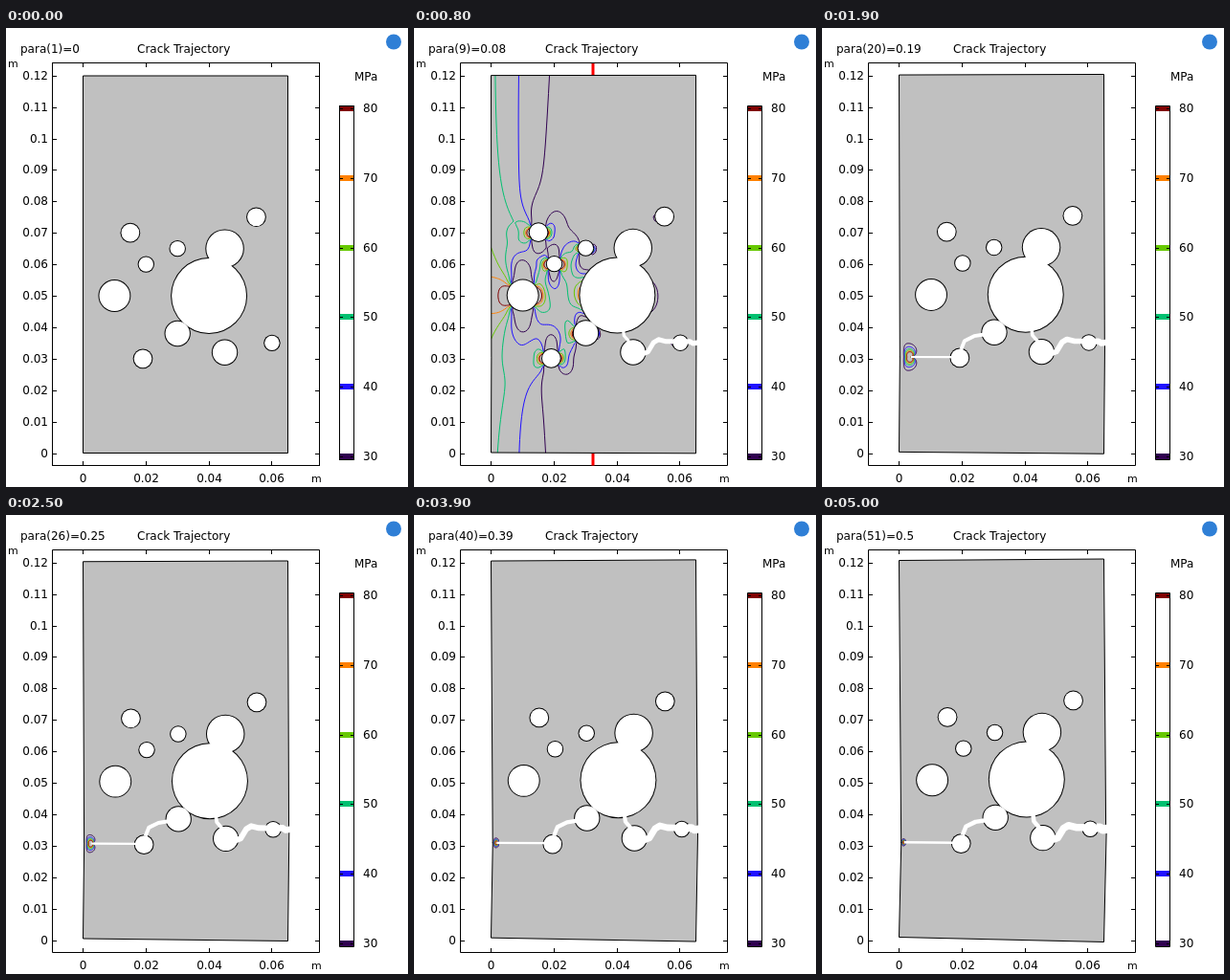
Write an HTML page with a canvas that moves like this. It is 420x480 px and loops after 5.1 s.

```html
<!DOCTYPE html>
<html lang="en">
<head>
<meta charset="utf-8">
<title>Crack Trajectory</title>
<style>
html, body { margin: 0; width: 100%; height: 100%; overflow: hidden; background: #fff; }
canvas { display: block; }
</style>
</head>
<body>
<canvas id="stage" width="420" height="480"></canvas>
<script>
const ctx = document.getElementById('stage').getContext('2d');
const STEPS = 51, STEP_MS = 100, SCALE = 3290, CELL = 2;
const LEFT = 80.5, RIGHT = 294.5, TOP = 50, BOTTOM = 444.5;
const LEVELS = [[30, '#300050'], [40, '#2010ff'], [50, '#00c070'], [60, '#66c800'], [70, '#ff8000'], [80, '#800000']];
const toX = x => LEFT + x * SCALE, toY = y => BOTTOM - y * SCALE;

// x, y, radius in mm; the last value marks holes that the crack cuts in two
const holes = [
  [40, 50, 12], [45, 65, 6], [10, 50, 5], [30, 38, 4], [45, 32, 4, 1], [55, 75, 3],
  [15, 70, 3], [19, 30, 3, 1], [30, 65, 2.5], [20, 60, 2.5], [60, 35, 2.5, 1]
].map(([x, y, r, split]) => ({ x: toX(x / 1000), y: toY(y / 1000), r: r * SCALE / 1000, part: split ? 0.5 : 0 }));

// first step, width, widening, points
const cracks = [
  [7, 4.5, 4.5, [[284, 328], [288, 328], [291, 330], [297, 329]]],
  [7, 4.5, 3, [[239, 341], [244, 339], [250, 329], [255, 326], [263, 328], [272, 328]]],
  [7, 3, 1.5, [[218, 315], [219, 322], [225, 329]]],
  [9, 3.5, 1, [[170, 321], [158, 323], [148, 328], [144.5, 337]]]
];

const loads = [0, .2, .4, .6, .8, 1, 1.2, .8, .5, .35, .24, .18];
const loadAt = k => loads[k] ?? .18 * (11 / k) ** 3;
const side = x => (x - 187) / 107;

// Largest principal stress for vertical tension, summing the Kirsch solution of each hole
function stress(x, y, list) {
  let yy = .93 + .26 * side(x) ** 2, xx = 0, xy = 0;
  for (const h of list) {
    const dx = x - h.x, dy = y - h.y, r = Math.hypot(dx, dy) || 1;
    const q = Math.min(1, (h.r / r) ** 2), c = dy / r, s = dx / r;
    const cos2 = c * c - s * s, sin2 = 2 * s * c, half = h.weight / 2;
    const rr = half * (-q + (3 * q * q - 4 * q) * cos2);
    const tt = half * (q - 3 * q * q * cos2);
    const rt = -half * (2 * q - 3 * q * q) * sin2;
    yy += rr * c * c + tt * s * s - rt * sin2;
    xx += rr * s * s + tt * c * c + rt * sin2;
    xy += (rr - tt) * sin2 / 2 + rt * cos2;
  }
  return { yy, main: (yy + xx) / 2 + Math.hypot((yy - xx) / 2, xy) };
}
holes.forEach((h, i) => { h.weight = Math.max(.25, stress(h.x, h.y, holes.slice(0, i)).yy); });

const cols = 109, rows = 199;
const field = Float32Array.from({ length: cols * rows }, (_, i) =>
  stress(LEFT + i % cols * CELL, TOP + Math.floor(i / cols) * CELL, holes).main);

function drawField(k) {
  const load = 50 * loadAt(k), tilt = k < 7 ? 0 : Math.min(1, (k - 6) * .4);
  const lastRow = k < 10 ? rows - 1 : 125;
  const values = field.map((f, i) => f * load * (1 - tilt * side(LEFT + i % cols * CELL)));
  for (const [level, color] of LEVELS) {
    ctx.beginPath();
    for (let j = 0; j < lastRow; j++) for (let i = 0; i < cols - 1; i++) {
      const at = j * cols + i;
      const corners = [[i, j, values[at]], [i + 1, j, values[at + 1]],
        [i + 1, j + 1, values[at + cols + 1]], [i, j + 1, values[at + cols]]];
      let drawing = false;
      corners.forEach((a, n) => {
        const b = corners[(n + 1) % 4];
        if (a[2] > level === b[2] > level) return;
        const t = (level - a[2]) / (b[2] - a[2]);
        const x = LEFT + CELL * (a[0] + t * (b[0] - a[0])), y = TOP + CELL * (a[1] + t * (b[1] - a[1]));
        drawing ? ctx.lineTo(x, y) : ctx.moveTo(x, y);
        drawing = !drawing;
      });
    }
    ctx.strokeStyle = color;
    ctx.stroke();
  }
}

const tipGap = k => Math.min(53, 126 / (k - 8));

function drawTip(k, move) {
  const gap = tipGap(k), [tx, ty] = move(LEFT + gap, 345, .5), reach = .71 * gap;
  for (const [level, color] of LEVELS) {
    const points = [];
    for (let n = -60; n <= 60; n++) {
      const a = n / 60 * Math.PI, r = gap * 30 / level * Math.cos(a / 2) * (1 + Math.abs(Math.sin(a / 2)));
      const ahead = r * Math.cos(a);
      points.push([tx - (ahead > 0 ? reach * Math.tanh(ahead / reach) : ahead), ty + r * Math.sin(a)]);
    }
    trace(points);
    ctx.strokeStyle = color;
    ctx.stroke();
  }
}

// Rigid turn of the upper (part 0) and lower (part 1) halves
const mover = p => (x, y, part) => {
  const u = (x - LEFT) / 214;
  const dx = (1 - part) * 2.2 * (y - TOP) / 295 + part * 2.3 * (BOTTOM - y) / 100;
  const dy = (1 - part) * (-2.5 - 1.5 * u) + part * (5 * u - 3);
  return [x + dx * p, y + dy * p];
};

function trace(points) {
  ctx.beginPath();
  points.forEach(([x, y]) => ctx.lineTo(x, y));
}

function box(x, y, w, h, color) {
  ctx.fillStyle = color;
  ctx.fillRect(x, y, w, h);
}

function label(text, x, y, align = 'left', size = 12) {
  ctx.font = `${size}px "DejaVu Sans", sans-serif`;
  ctx.textAlign = align;
  ctx.fillStyle = '#000';
  ctx.fillText(text, x, y);
}

function drawDiscs(move, grow, color) {
  ctx.fillStyle = color;
  for (const h of holes) {
    ctx.beginPath();
    ctx.arc(...move(h.x, h.y, h.part), h.r + grow, 0, 7);
    ctx.fill();
  }
}

function drawAxes(k) {
  ctx.strokeStyle = '#000';
  ctx.strokeRect(48.5, 36.5, 279, 421);
  for (let i = 0; i <= 12; i++) {
    const y = Math.round(toY(i / 100));
    box(49, y, 4, 1, '#000');
    box(323, y, 4, 1, '#000');
    label(String(i / 100), 44, y + 4, 'right');
  }
  for (let i = 0; i <= 3; i++) {
    const x = Math.floor(toX(i / 50));
    box(x, 37, 1, 4, '#000');
    box(x, 453, 1, 4, '#000');
    label(String(i / 50), x + .5, 475, 'center');
  }
  label(`para(${k + 1})=${k / 100}`, 15, 26);
  label('Crack Trajectory', 137, 26);
  label('m', 2, 41, 'left', 11);
  label('m', 319, 475, 'left', 11);
}

function drawLegend() {
  label('MPa', 364, 55);
  LEVELS.forEach(([level, color], i) => {
    const y = Math.round(448 - i * 72.8);
    box(349, y - 3, 14, 6, color);
    box(349, y, 3, 1, '#000');
    box(360, y, 3, 1, '#000');
    label(String(level), 373, y + 4);
  });
  ctx.strokeStyle = '#000';
  ctx.strokeRect(348.5, 81.5, 15, 370);
  ctx.fillStyle = '#2f7fd6';
  ctx.beginPath();
  ctx.arc(405, 14.5, 8, 0, 7);
  ctx.fill();
}

function draw(k) {
  const p = k < 7 ? 0 : k / 50, move = mover(p);
  const body = [[LEFT, TOP, 0], [RIGHT, TOP, 0], [RIGHT, 329, 0], [RIGHT, 329, 1],
    [RIGHT, BOTTOM, 1], [LEFT, BOTTOM, 1], [LEFT, 345, 1], [LEFT, 345, 0]].map(v => move(...v));
  box(0, 0, 420, 480, '#fff');
  ctx.lineWidth = 1;
  drawAxes(k);
  drawLegend();

  const load = loadAt(k), arrow = Math.min(13, load * 50);
  if (load > .1) {
    box(187 - load * 3, 50 - arrow, load * 6, arrow, '#f00');
    box(187 - load * 3, 444.5, load * 6, arrow, '#f00');
  }

  trace(body);
  ctx.closePath();
  ctx.fillStyle = '#c0c0c0';
  ctx.fill();
  ctx.save();
  ctx.clip();
  if (k) drawField(k);
  if (k >= 10) drawTip(k, move);
  ctx.restore();
  trace(body);
  ctx.closePath();
  ctx.strokeStyle = '#000';
  ctx.stroke();

  drawDiscs(move, .5, '#000');
  drawDiscs(move, -.5, '#fff');
  ctx.strokeStyle = '#fff';
  ctx.lineJoin = 'round';
  const left = [10, 1.8, .6, [[137, 345], [LEFT + (k >= 10 ? tipGap(k) : 53), 345]]];
  for (const [start, width, widen, points] of [...cracks, left]) {
    if (k < start) continue;
    trace(points.map(([x, y]) => move(x, y, .5)));
    ctx.lineWidth = width + widen * p;
    ctx.stroke();
  }
}

let shown = -1;
function tick() {
  const k = Math.floor(performance.now() / STEP_MS) % STEPS;
  if (k !== shown) draw(shown = k);
  requestAnimationFrame(tick);
}
tick();
</script>
</body>
</html>
```
